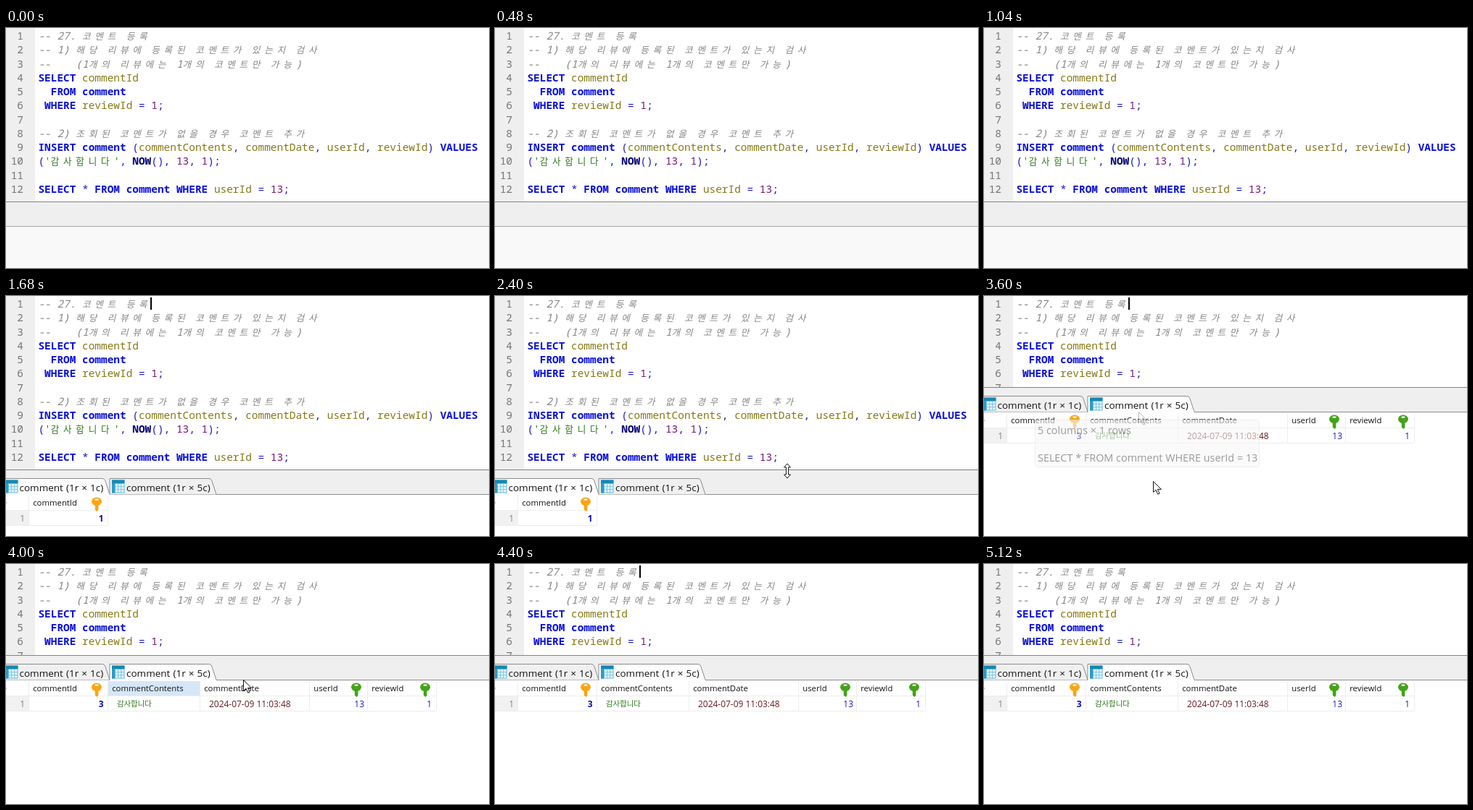
Write an HTML page that moves like this. It is 666 px wide and 332 px high and loops after 5200 ms.

```html
<!DOCTYPE html>
<html lang="ko">
<head>
<meta charset="utf-8">
<title>SQL editor</title>
<style>
  html, body { margin: 0; width: 100%; height: 100%; overflow: hidden; background: #fff; }
  svg { display: block; width: 100vw; height: 100vh; }
  .mono { font: 14.43px "Noto Sans Mono", monospace; }
  .cjk { font-family: "Noto Sans CJK KR", "Noto Sans CJK", sans-serif; font-size: 12.6px; }
  .ui { font-family: "Open Sans", "Noto Sans CJK KR", "Noto Sans CJK", sans-serif; }
  .comment { fill: #848484; font-style: italic; }
  .key { fill: #0a10d8; font-weight: 700; }
  .func { fill: #000070; font-weight: 700; }
  .name { fill: #857814; }
  .num { fill: #781478; }
  .str { fill: #2c7a1c; }
  .sym { fill: #1c1cc0; }
</style>
</head>
<body>
<svg id="stage" viewBox="0 0 666 332" preserveAspectRatio="none"></svg>
<script>
const LOOP = 5200, STEP = 80;
const CELL = 8.66, LEFT = 44.4, ROW = 19.27;
const SPLIT_LOW = 240, SPLIT_HIGH = 126;

const code = [
  '-- 27. 코멘트 등록',
  '-- 1) 해당 리뷰에 등록된 코멘트가 있는지 검사',
  '--    (1개의 리뷰에는 1개의 코멘트만 가능)',
  'SELECT commentId',
  '  FROM comment',
  ' WHERE reviewId = 1;',
  '',
  '-- 2) 조회된 코멘트가 없을 경우 코멘트 추가',
  'INSERT comment (commentContents, commentDate, userId, reviewId) VALUES',
  "('감사합니다', NOW(), 13, 1);",
  '',
  'SELECT * FROM comment WHERE userId = 13;'
];

const rect = (x, y, w, h, fill, more = '') =>
  `<rect x="${x}" y="${y}" width="${w}" height="${h}" fill="${fill}" ${more}/>`;
const path = (d, fill, stroke = 'none', more = '') =>
  `<path d="${d}" fill="${fill}" stroke="${stroke}" ${more}/>`;
const label = (x, y, size, fill, text, more = '') =>
  `<text class="ui" x="${x}" y="${y}" font-size="${size}" fill="${fill}" ${more}>${text}</text>`;

// ---- editor ----
const isWide = c => /[가-힣]/.test(c);

function kindOf(word) {
  if (/^(SELECT|FROM|WHERE|INSERT|VALUES|comment)$/.test(word)) return 'key';
  if (word === 'NOW') return 'func';
  if (/^[a-z]/i.test(word)) return 'name';
  if (/^\d/.test(word)) return 'num';
  if (/^['가-힣]/.test(word)) return 'str';
  return 'sym';
}

// Every glyph sits on the character grid; Hangul takes two cells.
function codeLine(line, row) {
  const y = (16 + row * ROW).toFixed(2);
  const remark = line.startsWith('--');
  const runs = /[가-힣]+|\s+|[a-zA-Z]+|\d+|[^\s\w가-힣]/g;
  let col = 0, out = '';
  for (const [run] of line.matchAll(runs)) {
    const xs = [...run].map(c => {
      const x = LEFT + col * CELL;
      col += isWide(c) ? 2 : 1;
      return x.toFixed(2);
    });
    if (!run.trim()) continue;
    const cls = `${isWide(run) ? 'cjk' : 'mono'} ${remark ? 'comment' : kindOf(run)}`;
    out += `<text class="${cls}" x="${xs.join(' ')}" y="${y}">${run}</text>`;
  }
  return out + `<text class="mono" x="24" y="${y}" text-anchor="end" fill="#757575">${row + 1}</text>`;
}

const editor = rect(0, 0, 666, 332, '#fff') + rect(0, 0, 40, 332, '#efefef') +
  code.map(codeLine).join('');

// ---- result panel, laid out for the raised splitter ----
function tableIcon(x) {
  let cells = '';
  for (let i = 0; i < 9; i++)
    cells += rect(x + 5 + i % 3 * 4.1, 146 + (i / 3 | 0) * 4.1, 3.2, 3.2, '#e9f7fd');
  return rect(x, 140.5, 17.5, 18, '#6cc0e2') + rect(x, 140.5, 17.5, 4.5, '#1489b4') +
    rect(x, 145, 4, 13.5, '#2b9cc6') + cells;
}

function tab(x, w, text, active) {
  const end = x + w;
  return path(`M${x} 160.5V138.5H${end - 10}Q${end - 7} 138.5 ${end - 6} 142L${end} 160.5`,
    active ? '#fdfdfd' : '#f0f0f0', '#8c8c8c') + tableIcon(x + (x < 0 ? 0 : 3)) +
    label(x + (x < 0 ? 19.5 : 23), 156, 13.5, '#111', text, 'word-spacing=".6"');
}

const tabs = active =>
  path('M0 160.5H666', 'none', '#8c8c8c') +
  tab(-1, 144, 'comment (1r × 1c)', active === 0) +
  tab(143, 147, 'comment (1r × 5c)', active === 1) +
  path(active ? 'M143.5 160.5H289.5' : 'M0 160.5H142.5', 'none', '#fdfdfd', 'stroke-width="1.4"');

const keyIcon = (x, fill) =>
  path(`M${x + 4.8} 173h4.6v9l-2 2l-2.6-2.4z`, fill) +
  `<ellipse cx="${x + 7}" cy="170.3" rx="7" ry="5.8" fill="${fill}"/>` +
  rect(x + 4.5, 166.6, 5, 2.2, '#fff', 'rx="1"');

const columns = [
  { x: 31, end: 140, name: 'commentId', key: '#f9a515' },
  { x: 140, end: 267, name: 'commentContents' },
  { x: 267, end: 418, name: 'commentDate' },
  { x: 418, end: 498, name: 'userId', key: '#43a318' },
  { x: 498, end: 593, name: 'reviewId', key: '#43a318' }
];
const right = 'text-anchor="end"';
const idCell = n => label(134.5, 197.5, 12, '#0a0aa8', n, `${right} font-weight="700"`);

function grid(cols, cells) {
  const end = cols[cols.length - 1].end;
  const head = cols.map(c =>
    label(c.x + 6.2, 176, 11.35, '#111', c.name) +
    (c.key ? keyIcon(c.end - 22, c.key) : '') +
    path(`M${c.end + .5} 162V203`, 'none', '#ededed')).join('');
  return rect(0, 183, 31, 20, '#f1f1f1') +
    path(`M31.5 162V203M0 182.5H${end}M0 203.5H${end}`, 'none', '#ededed') +
    rect(0, 171, 1, 2, '#bbb') + label(26, 197.5, 12, '#7c857c', '1', right) + head + cells;
}

const firstGrid = grid(columns.slice(0, 1), idCell(1));
const secondGrid = grid(columns,
  idCell(3) +
  label(153, 196.5, 10.4, '#2c7a1c', '감사합니다') +
  label(280, 197.5, 11.95, '#661820', '2024-07-09 11:03:48') +
  label(494, 197.5, 12, '#1c1cc0', '13', right) +
  label(587, 197.5, 12, '#1c1cc0', '1', right));

const tip = rect(70.5, 171.5, 309, 65, '#f8f8f8', 'stroke="#e6e6e6" rx="3"') +
  label(74, 191, 14.4, '#575757', '5 columns × 1 rows') +
  label(74, 229, 14.4, '#575757', 'SELECT * FROM comment WHERE userId = 13');

// ---- pointers, hot spot at 0,0 ----
const arrow = path('M.5.5V15.5L4 12.2L6.6 18.2L9 17.2L6.4 11.4H11.3Z', '#fff', '#111');
const pointers = {
  arrow,
  resize: path('M0-10L4.5-5H1.5V5H4.5L0 10L-4.5 5H-1.5V-5H-4.5Z', '#fff', '#111'),
  beam: path('M-3-8H3M0-8V8M-3 8H3', 'none', '#222')
};

const group = (id, body) => `<g id="${id}">${body}</g>`;
const stage = document.getElementById('stage');
stage.innerHTML = editor +
  group('caret', rect(199, 2, 2, 17, '#000')) +
  group('panel',
    rect(0, 126, 666, 330, '#fff') + rect(0, 126, 666, 34, '#efefef') +
    path('M0 126.5H666', 'none', '#838383') +
    group('empty', rect(0, 160, 666, 300, '#f9f9f9') + path('M0 160.5H666', 'none', '#a6a6a6')) +
    group('first', tabs(0) + firstGrid) +
    group('second', tabs(1) + group('hover', rect(141, 162, 126, 20, '#d5e7f7')) + secondGrid)) +
  group('tip', tip) +
  group('trail', `<g transform="translate(213 160)">${arrow}</g>`) +
  group('pointer', Object.keys(pointers).map(k => group(k, pointers[k])).join(''));

const part = {};
for (const g of stage.querySelectorAll('g[id]')) part[g.id] = g;

// ---- motion ----
const route = [
  [1720, 470, -25], [2080, 415, 271], [2240, 403, 242], [2420, 403, 242],
  [2700, 411, 128], [2860, 411, 128], [3100, 213, 160], [3460, 213, 160],
  [3600, 233, 256], [3680, 233, 256], [4000, 327, 160], [4320, 560, -25]
];
const caretOn = [[1360, 1890], [3340, 3870], [4400, 4930]];

const ramp = (t, a, b) => Math.min(1, Math.max(0, (t - a) / (b - a)));
const smooth = u => u * u * (3 - 2 * u);
const within = (t, a, b) => t >= a && t < b;
const show = (id, on) => part[id].setAttribute('visibility', on ? 'inherit' : 'hidden');

function pointerAt(t) {
  for (let i = 1; i < route.length; i++) {
    const [t0, x0, y0] = route[i - 1], [t1, x1, y1] = route[i];
    if (within(t, t0, t1)) {
      const u = smooth((t - t0) / (t1 - t0));
      return [x0 + (x1 - x0) * u, y0 + (y1 - y0) * u];
    }
  }
  return null;
}

function render(t) {
  const split = SPLIT_LOW + (SPLIT_HIGH - SPLIT_LOW) * smooth(ramp(t, 2420, 2700));
  part.panel.setAttribute('transform', `translate(0 ${Math.round(split - SPLIT_HIGH)})`);
  show('empty', t < 1360);
  show('first', within(t, 1360, 3160));
  show('second', t >= 3160);
  show('hover', within(t, 3880, 4060));
  show('caret', caretOn.some(([a, b]) => within(t, a, b)));

  part.tip.setAttribute('opacity', ramp(t, 3200, 3320) * (1 - ramp(t, 3520, 3720)));
  part.trail.setAttribute('opacity', within(t, 3520, 3680) ? .3 : 0);

  const pos = pointerAt(t);
  show('pointer', pos);
  let shape = '';
  if (pos) {
    const [x, y] = pos.map(Math.round);
    part.pointer.setAttribute('transform', `translate(${x} ${y})`);
    shape = Math.abs(y - split) < 6 ? 'resize' : y < split ? 'beam' : 'arrow';
  }
  for (const k in pointers) show(k, k === shape);
}

const start = performance.now();
function tick() {
  const t = (performance.now() - start) % LOOP;
  render(Math.floor(t / STEP) * STEP);
  requestAnimationFrame(tick);
}
tick();
</script>
</body>
</html>
```
